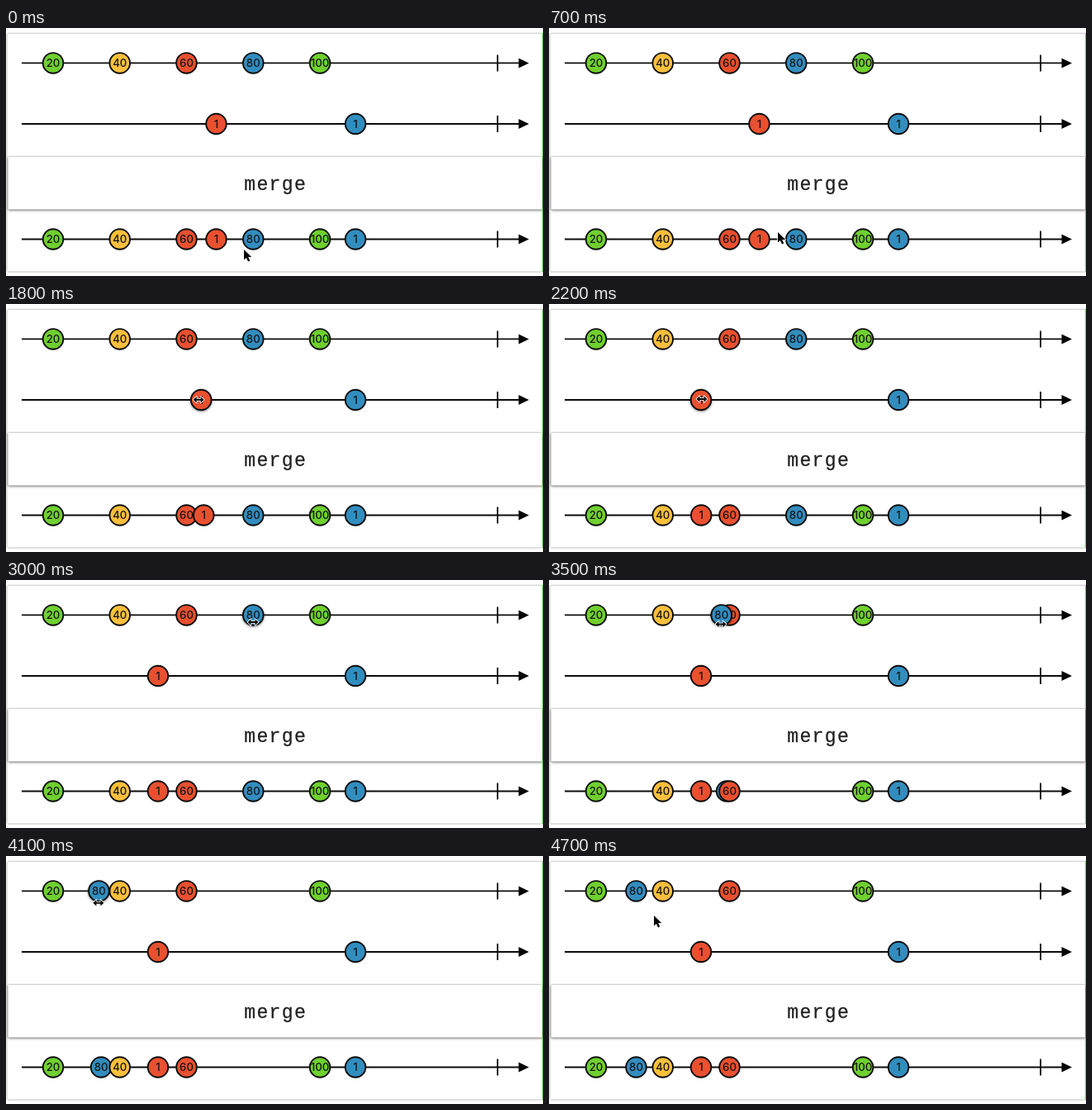
An HTML page that plays this animation: 650 by 300 pixels, repeating every 4.8 s.

```html
<!DOCTYPE html>
<html lang="en">
<head>
<meta charset="utf-8">
<title>merge marble diagram</title>
<style>
html, body { margin: 0; width: 100%; height: 100%; overflow: hidden; background: #fff; }
svg { display: block; width: 650px; height: 300px; }
.marble text { font: 500 13.2px Inter, "Liberation Sans", sans-serif; text-anchor: middle; fill: #161616; }
.marble circle { stroke: #0c0c0c; stroke-width: 1.9; }
.lifted { filter: drop-shadow(0 1.5px 1.5px rgba(0, 0, 0, .45)); }
.card { fill: #fff; filter: drop-shadow(0 0 1.2px rgba(0, 0, 0, .5)); }
.operator { fill: #fff; filter: drop-shadow(0 0 .8px rgba(0, 0, 0, .3)) drop-shadow(0 1px 1.5px rgba(0, 0, 0, .5)); }
.name { font: 23px "Liberation Mono", "Courier New", monospace; letter-spacing: 1.4px; text-anchor: middle; fill: #222; stroke: #222; stroke-width: .3; }
#pointer path { fill: #080808; stroke: #fff; stroke-width: 1.6; stroke-linejoin: round; paint-order: stroke; }
</style>
</head>
<body>
<svg viewBox="0 0 650 300">
  <rect class="card" x="1.5" y="7" width="648" height="287.5"/>
  <path d="M649.4 6V295" stroke="#79d66c" stroke-width="1.2"/>
  <rect class="operator" x="2.5" y="156" width="646.5" height="63.5" rx="1"/>
  <text class="name" x="326.2" y="196">merge</text>
  <g id="lines"></g>
  <g id="marbles"></g>
  <g id="pointer">
    <path id="arrow" d="M0 0V12.6L2.9 9.9L5 14.6L7.3 13.6L5.2 9H9.2Z"/>
    <path id="resize" d="M-6.5 0L-2.5 -3.8V-1H2.5V-3.8L6.5 0L2.5 3.8V1H-2.5V3.8Z"/>
  </g>
</svg>
<script>
const LOOP = 4800, STEP = 100, LAG = 20;
const ROWS = [42.4, 116, 255.5];
const GREEN = '#6fd02f', YELLOW = '#fbbf3c', RED = '#e9502f', BLUE = '#328dbf';

// Key points as [time, x, y], eased from one to the next.
const HAND = [
  [0, 288, 268], [700, 277, 247], [1400, 250, 116], [1600, 250, 116],
  [2200, 185, 115], [2400, 185, 115], [3000, 299, 51], [3100, 299, 51],
  [3800, 149, 55], [4200, 105, 57], [4700, 127, 72]
];

const first = [20, 40, 60, 80, 100].map((label, i) => ({
  label, row: 0, x: 57 + 80.75 * i, color: [GREEN, YELLOW, RED, BLUE][i % 4]
}));
const second = [
  { label: 1, row: 1, color: RED, drag: [[1600, 254.5], [2200, 184]] },
  { label: 1, row: 1, color: BLUE, x: 423 }
];
first[3].drag = [[3100, first[3].x], [3800, 150], [4200, 105.5]];

const byId = id => document.getElementById(id);
const layer = byId('marbles');

function make(tag, attrs, parent) {
  const node = document.createElementNS('http://www.w3.org/2000/svg', tag);
  for (const key in attrs) node.setAttribute(key, attrs[key]);
  return parent.appendChild(node);
}

function sample(keys, t) {
  const next = keys.findIndex(k => k[0] > t);
  if (next === 0) return keys[0].slice(1);
  if (next < 0) return keys.at(-1).slice(1);
  const [t0, ...from] = keys[next - 1], [t1, ...to] = keys[next];
  const k = (t - t0) / (t1 - t0);
  const eased = k * k * (3 - 2 * k);
  return from.map((v, i) => v + (to[i] - v) * eased);
}

const place = (node, x, y) => node.setAttribute('transform', `translate(${x} ${y})`);
const posX = (m, t) => m.drag ? sample(m.drag, t)[0] : m.x;
const isDragged = (m, t) => m.drag && t >= m.drag[0][0] && t <= m.drag.at(-1)[0];

function addMarble(m) {
  const node = make('g', { class: 'marble' }, layer);
  make('circle', { r: 12.3, fill: m.color }, node);
  make('text', { y: 4.7 }, node).textContent = m.label;
  return { m, node };
}

for (const y of ROWS) {
  make('path', { d: `M19 ${y}H623M595 ${y - 10}V${y + 10}`, stroke: '#0c0c0c', 'stroke-width': 1.8 }, byId('lines'));
  make('path', { d: `M620.5 ${y - 6}L633 ${y}L620.5 ${y + 6}Z`, fill: '#050505' }, byId('lines'));
}
const sources = [...first, ...second];
const inputs = sources.map(addMarble);
const outputs = sources.map(addMarble);

function draw(t) {
  const [px, py] = sample(HAND, t);
  let held = false;
  for (const { m, node } of inputs) {
    const x = posX(m, t), y = ROWS[m.row];
    const active = isDragged(m, t) || Math.hypot(px - x, py - y) < 13;
    held ||= active;
    place(node, x, y);
    node.classList.toggle('lifted', active);
  }

  // Later values in the merged stream overlap earlier ones.
  outputs.sort((a, b) => posX(a.m, t - LAG) - posX(b.m, t - LAG));
  for (const { m, node } of outputs) {
    place(node, posX(m, t - LAG), ROWS[2]);
    layer.append(node);
  }

  place(byId('pointer'), px, py);
  byId('arrow').style.display = held ? 'none' : '';
  byId('resize').style.display = held ? '' : 'none';
}

const start = performance.now();
function tick() {
  const t = (performance.now() - start) % LOOP;
  draw(Math.floor(t / STEP) * STEP);
  requestAnimationFrame(tick);
}
tick();
</script>
</body>
</html>
```
